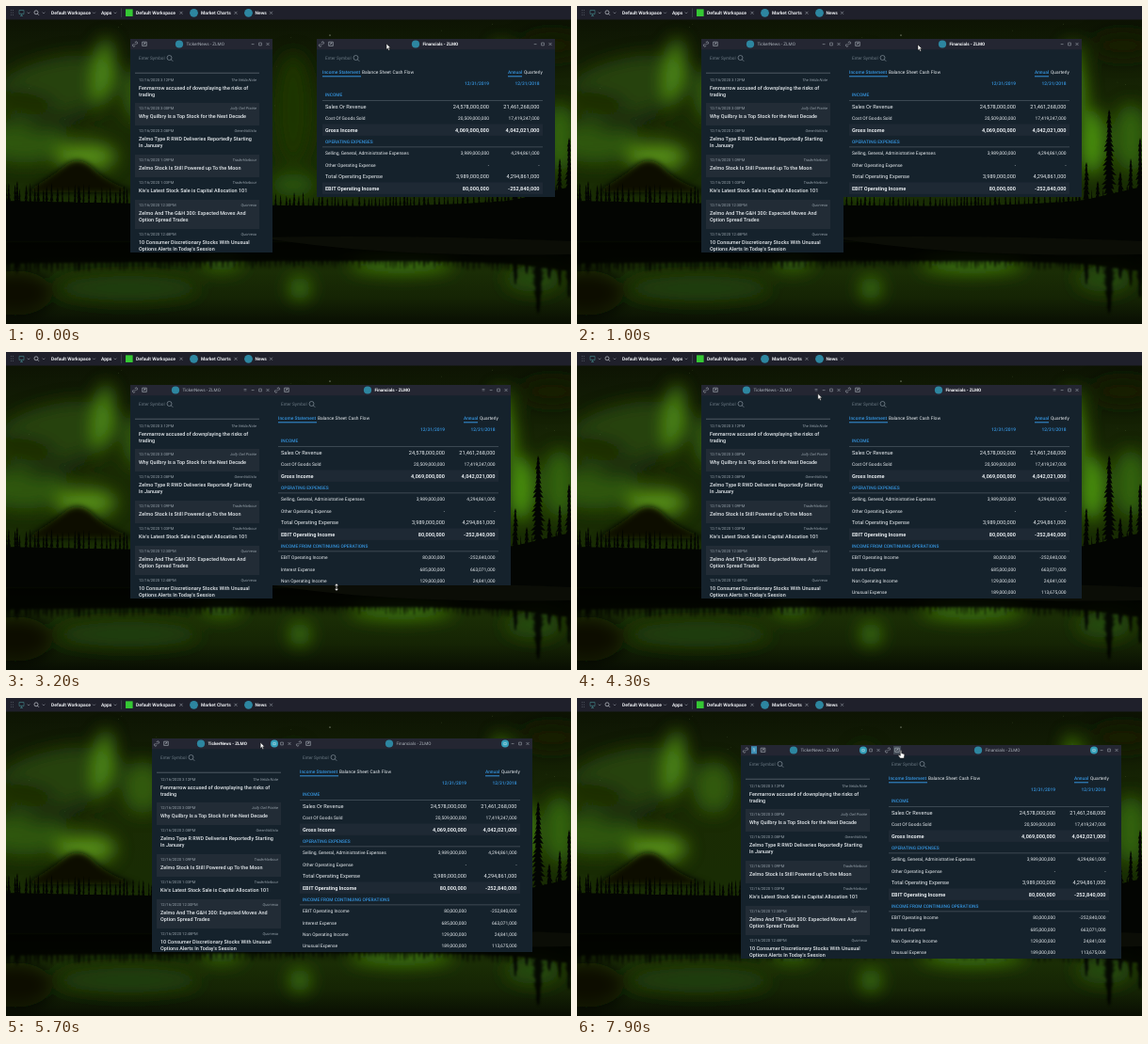
Animation of 600 by 338 pixels, one loop 8000 ms. Source, as an HTML page:

```html
<!DOCTYPE html>
<html lang="en">
<head>
<meta charset="utf-8">
<title>Trading workspace</title>
<style>
html, body { margin: 0; width: 100%; height: 100%; overflow: hidden; background: #060a04; }
svg { display: block; }
#stage { width: 100vw; height: 100vh; }
text { font-family: Roboto, Arial, sans-serif; text-rendering: geometricPrecision; white-space: pre; }
</style>
</head>
<body>
<svg id="stage" viewBox="0 0 600 338" preserveAspectRatio="none">
  <defs>
    <linearGradient id="sky" x2="0" y2="1">
      <stop offset="0" stop-color="#0c1103"/><stop offset=".15" stop-color="#101904"/>
      <stop offset=".5" stop-color="#1a2b04"/><stop offset="1" stop-color="#182d04"/>
    </linearGradient>
    <linearGradient id="lake" x2="0" y2="1">
      <stop offset="0" stop-color="#0a1003"/><stop offset=".4" stop-color="#1a2d05"/>
      <stop offset=".7" stop-color="#152404"/><stop offset="1" stop-color="#090e03"/>
    </linearGradient>
    <filter id="soft" x="-100%" y="-100%" width="300%" height="300%"><feGaussianBlur stdDeviation="9"/></filter>
    <filter id="near" x="-30%" y="-60%" width="160%" height="220%"><feGaussianBlur stdDeviation="3"/></filter>
    <filter id="ripple"><feGaussianBlur stdDeviation="1 2"/></filter>
  </defs>
  <g id="scene"></g>
  <g id="top"></g>
  <svg id="news" width="151" height="227"></svg>
  <svg id="fin" width="253" height="168"></svg>
  <g id="pointer"></g>
</svg>
<script>
const $ = id => document.getElementById(id);
const TICKER = 'ZLMO', BLUE = '#3593dc', TEAL = '#2d86a0';

const rect = (x, y, w, h, fill, extra = '') =>
  `<rect x="${x}" y="${y}" width="${w}" height="${h}" fill="${fill}" ${extra}/>`;
const disc = (x, y, r, fill) => `<circle cx="${x}" cy="${y}" r="${r}" fill="${fill}"/>`;
const line = (d, color, w = .7) =>
  `<path d="${d}" fill="none" stroke="${color}" stroke-width="${w}"/>`;
const text = (x, y, s, size, fill, extra = '') =>
  `<text x="${x}" y="${y}" font-size="${size}" fill="${fill}" ${extra}>${s.replace(/&/g, '&amp;')}</text>`;
const END = 'text-anchor="end"', MED = 'font-weight="500"', BOLD = 'font-weight="600"';
const cross = (x, y, c = '#9aa1aa') => line(`M${x - 1.5} ${y - 1.5}l3 3m0-3l-3 3`, c, .6);
const lens = (x, y, r, c) =>
  `<circle cx="${x}" cy="${y}" r="${r}" fill="none" stroke="${c}" stroke-width=".7"/>` +
  line(`M${x + r * .7} ${y + r * .7}l${r * .8} ${r * .8}`, c);

/* ---------- landscape ---------- */
let seed = 11;
const rnd = () => (seed = (seed * 16807) % 2147483647) / 2147483647;

function spruce(x, top, base, half) {
  const n = Math.max(4, Math.round((base - top) / 5));
  let left = '', right = '';
  const side = (dir, i) => {
    const y = top + (base - top) * i / n, w = dir * half * (.15 + .85 * i / n) * (.6 + .6 * rnd());
    return [`${(x + w).toFixed(1)} ${y.toFixed(1)}`, `${(x + w * .4).toFixed(1)} ${(y - 1).toFixed(1)}`];
  };
  for (let i = 1; i <= n; i++) {
    const r = side(1, i), l = side(-1, i);
    right += `L${r[0]}L${r[1]}`;
    left = `L${l[1]}L${l[0]}` + left;
  }
  return `M${x} ${top}${right}${left}Z`;
}

function scene() {
  const glow = ([x, y, rx, ry, fill, turn = 0]) =>
    `<ellipse cx="${x}" cy="${y}" rx="${rx}" ry="${ry}" fill="${fill}" transform="rotate(${turn} ${x} ${y})"/>`;
  const aurora = [
    [55, 85, 70, 30, '#26430a', -12], [103, 70, 9, 36, '#4f8c12', 6], [145, 95, 22, 28, '#315a09'],
    [20, 145, 45, 22, '#2f5608'], [85, 160, 32, 14, '#568f16'], [20, 100, 34, 8, '#131e04', 10],
    [60, 125, 40, 6, '#16230a', -8], [305, 110, 20, 60, '#1c3505'], [305, 190, 24, 12, '#2c5607'],
    [530, 80, 9, 42, '#4a8a10', -8], [547, 145, 13, 34, '#4c9410'], [588, 140, 18, 36, '#32620a'],
    [580, 42, 34, 14, '#121c04']
  ];
  const shine = [
    [130, 300, 75, 13, '#22400a'], [229, 273, 22, 9, '#346408'], [312, 300, 11, 12, '#3c760d'],
    [420, 275, 55, 9, '#3f7a0c'], [560, 290, 30, 14, '#274c07'], [10, 305, 40, 24, '#070b03']
  ];
  // a low ridge of trees, taller towards both sides
  let trees = '';
  for (let x = -4; x < 606; x += 3 + rnd() * 4) {
    const rise = 10 * Math.abs(x - 350) / 300;
    trees += spruce(+x.toFixed(1), 206 - rise - rnd() * 9, 232, 2 + rnd() * 2);
  }
  [[12, 186, 5], [77, 190, 4], [541, 166, 7], [553, 186, 6], [565, 110, 11], [577, 176, 8],
   [588, 162, 7], [598, 140, 8]]
    .forEach(([x, top, w]) => trees += spruce(x, top, 240, w));
  const land = trees + 'M0 207Q140 210 300 212T540 206L600 192V250H0Z';
  let stars = '';
  for (let i = 0; i < 30; i++) stars += disc(rnd() * 600, 16 + rnd() * 120, .3, '#55693c');
  return rect(0, 0, 600, 250, 'url(#sky)') +
    `<g filter="url(#soft)">${aurora.map(glow).join('')}</g>` + stars + disc(344, 31, .6, '#d5dccb') +
    '<path d="M20 198Q45 184 62 170T96 176Q112 190 140 198Z" fill="#0a0f05" filter="url(#near)"/>' +
    rect(0, 245, 600, 93, 'url(#lake)') + `<g filter="url(#soft)">${shine.map(glow).join('')}</g>` +
    `<path d="${land}" fill="#040602" opacity=".85" filter="url(#ripple)" transform="matrix(1 0 0 -.55 0 387.5)"/>` +
    `<path d="${land}" fill="#030502"/>` +
    '<path d="M270 246Q420 243 600 250V264Q400 268 270 246Z" fill="#0b0d06"/>';
}

/* ---------- application bar ---------- */
function topBar() {
  const W = '#e9ebef', G = '#8d939d';
  const label = (x, s) => text(x, 9, s, 4.95, W, BOLD);
  const chevron = x => line(`M${x - 1.4} 6.6l1.4 1.4l1.4-1.4`, G, .6);
  return rect(0, 0, 600, 14.5, '#1f202b') +
    [4.5, 7, 9.5].map(y => disc(5.5, y, .5, '#5b606b') + disc(7.5, y, .5, '#5b606b')).join('') +
    line('M14 4.5h5v4h-5zM16.5 8.5v2m-1.5 0h3', '#3f7d80') + chevron(24) + lens(32, 6.8, 2, '#c4c9d0') + chevron(40) +
    label(48, 'Default Workspace') + chevron(93.5) + label(101, 'Apps') + chevron(116) +
    line('M122.5 2.5v9.5', '#4a4d59', .6) +
    rect(127, 3.4, 7.6, 7.6, '#35c834') + label(138, 'Default Workspace') + cross(186, 7.3) +
    disc(199.5, 7.3, 4.4, TEAL) + label(207, 'Market Charts') + cross(244, 7.3) +
    disc(257.5, 7.3, 4.4, TEAL) + label(264.5, 'News') + cross(281.5, 7.3);
}

/* ---------- windows ---------- */
const search = x => text(x, 22.3, 'Enter Symbol', 4.7, '#6b7983') + lens(x + 32.5, 20, 2.5, '#83909a');

function newsBody() {
  const items = [
    [35, 33, '3:12PM', 'The Velda Note', 'Fenmarrow accused of downplaying the risks of', 'trading'],
    [68, 24, '3:00PM', 'Jolly Owl Prairie', 'Why Quilbry Is a Top Stock for the Next Decade'],
    [92, 31, '2:08PM', 'GreenVoltista', 'Zelmo Type R RWD Deliveries Reportedly Starting', 'In January'],
    [123, 24, '1:09PM', 'TraderHarbour', 'Zelmo Stock Is Still Powered up To the Moon'],
    [147, 24, '1:03PM', 'TraderHarbour', 'Kiv\'s Latest Stock Sale is Capital Allocation 101'],
    [171, 31, '12:30PM', 'Quorvexa', 'Zelmo And The G&H 300: Expected Moves And', 'Option Spread Trades'],
    [202, 31, '12:48PM', 'Quorvexa', '10 Consumer Discretionary Stocks With Unusual', 'Options Alerts In Today\'s Session']
  ];
  return rect(0, 0, 151, 227, '#15222c') + search(9) + rect(5, 35.8, 132, .7, '#66717a') +
    items.map(([y, h, time, source, ...lines], i) => {
      const first = i ? y : y + 3;
      return (i % 2 ? rect(5, y, 132, h, '#222c36') : '') +
        text(9, first + 6.5, '12/16/2020 ' + time, 4.15, '#939ea7') +
        text(134, first + 6.5, source, 4.05, '#939ea7', END + ' font-style="italic"') +
        lines.map((s, k) => text(9, first + 16 + k * 7.1, s, 5.45, '#e6ebef', MED)).join('');
    }).join('');
}

const ROW = 12.4, ROW0 = 53.3;
const rows = [
  ['h', 'INCOME'],
  ['n', 'Sales Or Revenue', '24,578,000,000', '21,461,268,000'],
  ['s', 'Cost Of Goods Sold', '20,509,000,000', '17,419,247,000'],
  ['b', 'Gross Income', '4,069,000,000', '4,042,021,000'],
  ['h', 'OPERATING EXPENSES'],
  ['s', 'Selling, General, Administrative Expenses', '3,989,000,000', '4,294,861,000'],
  ['s', 'Other Operating Expense', '-', '-'],
  ['n', 'Total Operating Expense', '3,989,000,000', '4,294,861,000'],
  ['b', 'EBIT Operating Income', '80,000,000', '-252,840,000'],
  ['h', 'INCOME FROM CONTINUING OPERATIONS'],
  ['s', 'EBIT Operating Income', '80,000,000', '-252,840,000'],
  ['s', 'Interest Expense', '685,000,000', '663,071,000'],
  ['s', 'Non Operating Income', '129,000,000', '24,841,000'],
  ['s', 'Unusual Expense', '189,000,000', '113,675,000']
];

function finBody() {
  const W = '#e6ebef';
  const style = { h: [4.8, BLUE, MED], n: [5.65, W, ''], s: [4.88, W, ''], b: [5.55, W, BOLD] };
  const tab = (x, s, on) => text(x, 36.7, s, 4.88, on ? BLUE : W, on ? MED : '');
  const shade = rows.map(([kind], i) =>
    kind === 'b' ? rect(6, ROW0 + i * ROW, 234, ROW, '#1e2934') : '').join('');
  const cells = rows.map(([kind, name, a, b], i) => {
    const y = ROW0 + i * ROW, [size, fill, weight] = style[kind], base = y + 6.2 + size * .36;
    return text(9, base, name, size, fill, weight) + (kind === 'h'
      ? rect(6, y + ROW - .7, 234, .6, '#56626c')
      : text(183, base, a, size, fill, `${END} ${weight}`) + text(236.5, base, b, size, fill, `${END} ${weight}`));
  }).join('');
  return rect(0, 0, 253, 227, '#15222c') + search(9) +
    tab(6, 'Income Statement', true) + tab(48, 'Balance Sheet') + tab(80.5, 'Cash Flow') +
    tab(203, 'Annual', true) + tab(220, 'Quarterly') +
    rect(6, 39.3, 41, 1, BLUE) + rect(203, 39.3, 15, 1, BLUE) +
    text(183, 48.8, '12/31/2019', 4.88, BLUE, `${END} ${MED}`) +
    text(236.5, 48.8, '12/31/2018', 4.88, BLUE, `${END} ${MED}`) +
    shade + rect(6, 0, 234, ROW, '#2d3640', 'id="hover"') + cells;
}

const link = (x, hot) => (hot ? rect(x - 4, 1, 8, 9, '#414954') : '') +
  line(`M${x - .9} 6.4l1.8-1.8M${x - .3} 4l.7-.7a1.2 1.2 0 0 1 1.8 1.8l-.7 .7M${x + .3} 7l-.7 .7a1.2 1.2 0 0 1-1.8-1.8l.7-.7`, '#b4bbc3', .6);
const popOut = (x, hot) => (hot ? rect(x - 4, 1, 8, 9, '#414954') : '') +
  line(`M${x - 2.3} 3.2h4.6v4.2h-4.6zM${x - 1.2} 6l2-1.6m-1.2 0h1.2v1.2`, '#b4bbc3', .6);

// state: 0 alone, 1 adjacent, 2 grouped
function bar({ w, name, icon, min, state, bright, hotLink, hotPop, channel }) {
  const G = '#9aa1aa', right = w - 5, group = right - 24, badge = min ? group : right - 16;
  let s = rect(0, 0, w, 11.2, '#242632') + link(5, hotLink);
  if (channel) s += rect(11, 1.2, 6, 8.2, '#3f8fb4') + text(14, 7.2, '1', 5, '#fff', 'text-anchor="middle"');
  s += popOut(channel ? 23.5 : 15, hotPop) + disc(icon, 5.5, 4.1, TEAL) +
    text(icon + 7.4, 7.3, `${name} - ${TICKER}`, 4.65, bright ? '#f3f5f7' : '#aab1b9', bright ? BOLD : '');
  if (min) s += line(`M${right - 17.3} 5.6h2.8`, G, .6);
  if (state === 1) s += line(`M${group - 1.4} 4.5h2.8m-2.8 1.4h2.8`, G, .5);
  if (state === 2) s += disc(badge, 5.5, 4, '#359fb8') + line(`M${badge - 1.3} 4.6h2.6v2h-2.6z`, '#d5eef3', .5);
  return s + line(`M${right - 9.4} 4.1h2.8v2.8h-2.8z`, G, .6) + cross(right, 5.5, G);
}

/* ---------- pointer ---------- */
const path = [
  [0, 404, 40], [850, 362, 41], [1150, 362, 41], [1650, 360, 191], [1900, 360, 191], [2300, 351, 205],
  [2500, 351, 205], [3525, 351, 264], [3750, 351, 264], [4350, 254, 40], [4650, 254, 40], [5000, 247, 39],
  [5300, 247, 39], [6050, 289, 54], [6180, 289, 54], [6540, 180, 53], [6750, 180, 53], [6950, 188, 54],
  [7200, 188, 54], [7750, 344, 56], [8000, 344, 56]
];
function pointerAt(t) {
  const i = Math.max(1, path.findIndex(p => p[0] > t));
  const [t0, x0, y0] = path[i - 1], [t1, x1, y1] = path[i];
  const u = (t - t0) / (t1 - t0), e = u * u * (3 - 2 * u);
  return [x0 + (x1 - x0) * e, y0 + (y1 - y0) * e];
}
const shape = (d, w = .5) =>
  `<path d="${d}" fill="#fff" stroke="#111" stroke-width="${w}" stroke-linejoin="round"/>`;
const shapes = {
  arrow: shape('M0 0V6.2L1.4 4.9L2.4 7.2L3.5 6.7L2.5 4.5H4.4Z'),
  resize: shape('M0-4L2-1.6H.5V1.6H2L0 4L-2 1.6H-.5V-1.6H-2Z', .4),
  hand: shape('M-.7 0Q0-.8.7 0V2.8L3.2 3.4Q4 3.8 3.8 4.8L3.2 8H-.8L-2.8 5.2Q-2.9 4.3-2 4.4L-.7 5.4Z')
};

/* ---------- playback ---------- */
const place = (el, x, y) => { el.setAttribute('x', x); el.setAttribute('y', y); };

function draw(t) {
  const [px, py] = pointerAt(t);
  const state = t < 1200 ? 0 : t < 4500 ? 1 : 2;
  const newsFocus = t >= 4450 && t < 7000, finFocus = t < 4450;
  const channel = t >= 6950;

  // the dragged window snaps to its neighbour's edge
  const loose = px - 74;
  const finX = t < 1150 && loose > 291 ? loose : 283;
  const dragged = Math.min(Math.max(t, 5300), 6050), [dx, dy] = pointerAt(dragged);
  const moveX = Math.floor(dx - 247), moveY = Math.floor(dy - 39);
  const height = t < 2500 ? 168 : t < 3525 ? py - 37 : 227;

  place($('news'), 132 + moveX, 35 + moveY);
  place($('fin'), finX + moveX, 35 + moveY);
  $('fin').setAttribute('height', height);

  $('newsBar').innerHTML = bar({
    w: 151, name: 'TickerNews', icon: state === 1 ? 48 : channel ? 56 : 52, min: state < 2, state,
    bright: newsFocus, hotLink: t >= 6500 && t < 6900, channel
  });
  $('finBar').innerHTML = bar({
    w: 253, name: 'Financials', icon: state ? 101 : 105, min: true, state,
    bright: finFocus, hotPop: t >= 7650
  });

  const resizing = t >= 2250 && t < 3750;
  const lx = px - finX - moveX, ly = py - 35 - moveY, index = Math.floor((ly - ROW0) / ROW);
  const over = !resizing && lx > 6 && lx < 240 && ly < height && rows[index] && rows[index][0] !== 'h';
  $('hover').setAttribute('y', ROW0 + index * ROW);
  $('hover').setAttribute('opacity', over ? 1 : 0);

  const kind = resizing ? 'resize' : (t >= 4330 && t < 4680) || (t >= 6500 && t < 7250) || t >= 7650 ? 'hand' : 'arrow';
  $('pointer').innerHTML = shapes[kind];
  $('pointer').setAttribute('transform', `translate(${px} ${py})`);
}

$('scene').innerHTML = scene();
$('top').innerHTML = topBar();
$('news').innerHTML = newsBody() + '<g id="newsBar"></g>';
$('fin').innerHTML = finBody() + '<g id="finBar"></g>';

const start = performance.now();
(function frame() {
  draw((performance.now() - start) % 8000);
  requestAnimationFrame(frame);
})();
</script>
</body>
</html>
```
